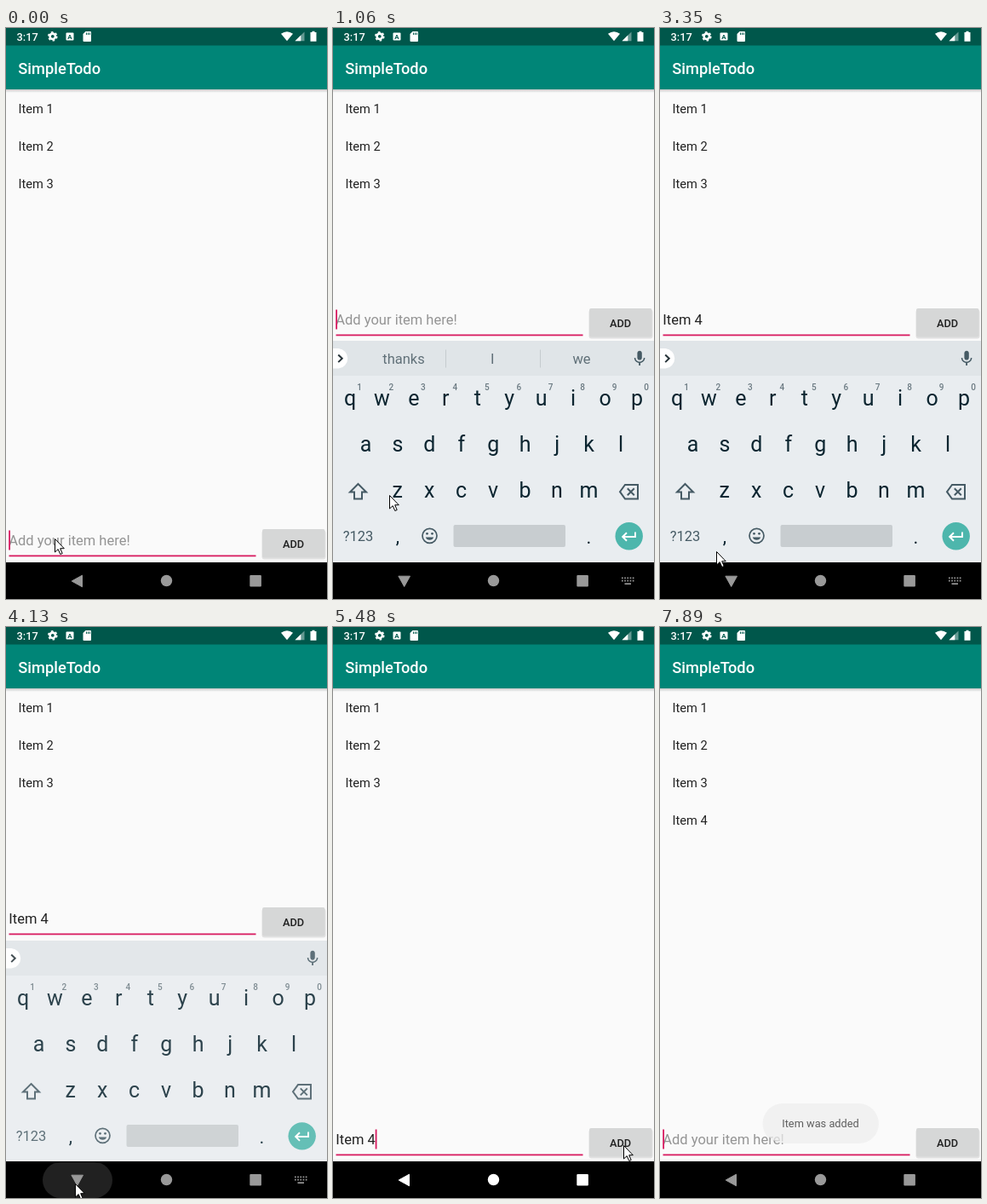
These frames come from a looping animation (377 px wide and 670 px high, 8 s). An HTML page:

```html
<!DOCTYPE html>
<html lang="en">
<head>
<meta charset="utf-8">
<title>Todo list demo</title>
<style>
  html, body { margin: 0; width: 100%; height: 100%; overflow: hidden; background: #fafafa; }
  svg { display: block; width: 377px; height: 670px; font-family: Roboto, sans-serif; }
  text { white-space: pre; }
  .mid { text-anchor: middle; }
  .line { fill: none; stroke: #455a64; stroke-width: 2; }
</style>
</head>
<body>
<svg viewBox="0 0 377 670">
  <defs>
    <linearGradient id="shade" x2="0" y2="1">
      <stop stop-opacity=".2"/><stop offset="1" stop-opacity="0"/>
    </linearGradient>
  </defs>
  <rect width="377" height="670" fill="#fafafa"/>

  <!-- status and app bars -->
  <rect width="377" height="72" fill="#008577"/>
  <rect width="377" height="20.5" fill="#00574b"/>
  <rect y="72" width="377" height="4" fill="url(#shade)"/>
  <g fill="#fff">
    <text x="12.5" y="14.6" font-size="12.8" font-weight="500">3:17</text>
    <g fill="none" stroke="#fff">
      <circle cx="54.8" cy="9.8" r="3.2" stroke-width="2.6"/>
      <circle cx="54.8" cy="9.8" r="5" stroke-width="1.6" stroke-dasharray="2.6 2.636"/>
    </g>
    <rect x="70.5" y="5.5" width="9" height="9" rx="1"/>
    <text class="mid" x="75" y="12.8" font-size="8" font-weight="700" fill="#00574b">A</text>
    <path d="M93.5 4H99q1 0 1 1v10q0 1-1 1h-7.500q-1 0-1-1V7z"/>
    <path d="M94.500 5.500v2.500M96.500 5.500v2.500M98.400 5.500v2.500" stroke="#00574b"/>
    <path d="M323 6.700Q330 1.700 337 6.700L330 15.300z"/>
    <path d="M350.500 4.500V15.300H339.500z" opacity=".4"/>
    <path d="M346.300 8.600V15.300H339.500z"/>
    <path d="M357.500 5h2v-1.300h3V5h2v10.800h-7z"/>
    <text x="14.300" y="53.500" font-size="18.300" font-weight="500">SimpleTodo</text>
  </g>
  <g font-size="14.670" fill="#212121">
    <text x="14.500" y="100.300">Item 1</text>
    <text x="14.500" y="144.300">Item 2</text>
    <text x="14.500" y="188.300">Item 3</text>
    <text x="14.500" y="232.300" id="added">Item 4</text>
  </g>

  <!-- input row -->
  <g id="row">
    <text id="hint" x="3.300" y="607" font-size="16.500" fill="#949494">Add your item here!</text>
    <text id="entry" x="3.300" y="607" font-size="16.500" fill="#212121"></text>
    <rect id="composing" x="3.500" y="608.500" height="1" fill="#212121"/>
    <rect id="caret" y="589.500" width="1.800" height="23" fill="#d81b60"/>
    <rect x="3.500" y="618.500" width="290" height="1.800" fill="#d81b60"/>
    <rect x="300.500" y="589.500" width="75" height="34" rx="3" opacity=".1"/>
    <rect x="301" y="588" width="73.500" height="33.500" rx="2" fill="#d6d7d7"/>
    <rect id="press" x="301" y="588" width="73.500" height="33.500" rx="2"/>
    <text class="mid" x="337.600" y="609.500" font-size="12.800" font-weight="500" fill="#212121">ADD</text>
  </g>

  <g id="toast">
    <rect x="120.500" y="560" width="136.500" height="46" rx="23" opacity=".05"/>
    <rect x="121" y="559" width="135.500" height="46" rx="23" fill="#eee"/>
    <text class="mid" x="188.500" y="586.700" font-size="12.800" fill="#222">Item was added</text>
  </g>

  <g id="keyboard">
    <rect y="367" width="377" height="262" fill="#e9edf0"/>
    <rect y="367" width="377" height="41" fill="#e0e5e8"/>
    <path d="M0 376H6.500a11.800 11.800 0 0 1 0 23.500H0z" fill="#fff"/>
    <path class="line" d="M6.200 383.500l4.500 4.300l-4.500 4.300" style="stroke:#263238"/>
    <g transform="translate(349.300 377) scale(.9)" fill="#455a64">
      <path d="M12 14c1.660 0 3-1.340 3-3V5c0-1.660-1.340-3-3-3S9 3.340 9 5v6c0 1.660 1.340 3 3 3z"/>
      <path d="M17.300 11c0 3-2.540 5.100-5.300 5.100S6.700 14 6.700 11H5c0 3.410 2.720 6.230 6 6.720V21h2v-3.280c3.280-.480 6-3.300 6-6.720z"/>
    </g>
    <g id="words" font-size="16.500" fill="#607078">
      <path d="M132.500 377.500v21M243.500 377.500v21" stroke="#c5cbce"/>
    </g>
    <g id="keys" fill="#0b2530"></g>
    <path class="line" d="M29.500 535L39 544.500H34V552.500H25V544.500H20z"/>
    <path class="line" d="M343 536H358V552.500H343L337 544.200zM345.800 540.300l8 8m0-8l-8 8"/>
    <text class="mid" x="29.500" y="602" font-size="16.500" fill="#455a64">?123</text>
    <circle class="line" cx="113.500" cy="595.800" r="8.500" style="stroke-width:1.700"/>
    <path d="M108.800 597.500a5 5 0 0 0 9.400 0z" fill="#455a64"/>
    <circle cx="110.500" cy="593.300" r="1.400" fill="#455a64"/>
    <circle cx="116.500" cy="593.300" r="1.400" fill="#455a64"/>
    <rect x="141.500" y="583" width="131.500" height="26" rx="2" fill="#c8cdd0"/>
    <circle cx="347.700" cy="596.300" r="16.200" fill="#4db6ac"/>
    <path class="line" d="M355 591.500V597H340.500M345 592.200L340.200 597L345 601.800" style="stroke:#fff"/>
  </g>

  <!-- navigation bar -->
  <rect y="627" width="377" height="43"/>
  <rect id="ripple" y="628" height="42" fill="#fff"/>
  <g id="nav">
    <path id="back" d="M-6.500 0L5.800-6.800V6.800z" stroke-width="1" stroke-linejoin="round"/>
    <circle cx="188.500" cy="648.500" r="6.700"/>
    <rect x="286.300" y="642" width="13.600" height="13.600" rx="1"/>
  </g>
  <g id="switcher" fill="none" stroke="#999" stroke-width="1.700">
    <path d="M339 645.300h14.500M339 648.700h14.500" stroke-dasharray="1.700 1.500"/>
    <path d="M342.500 652.200h7.500"/>
  </g>

  <path id="mouse" d="M.5.500V16L4.200 12.600L6.800 18.500L9.200 17.500L6.700 11.700H11.300z" fill="#fff" stroke="#000"/>
</svg>

<script>
const $ = id => document.getElementById(id);
const clamp = v => Math.max(0, Math.min(1, v));
const ramp = (t, from, to) => clamp((t - from) / (to - from));
const set = (id, attrs) => {
  for (const name in attrs) $(id).setAttribute(name, attrs[name]);
};
const show = (id, on) => set(id, { opacity: on ? 1 : 0 });

function label(parent, text, x, y, size) {
  const el = document.createElementNS('http://www.w3.org/2000/svg', 'text');
  el.textContent = text;
  const attrs = { x, y, class: 'mid', 'font-size': size };
  for (const name in attrs) el.setAttribute(name, attrs[name]);
  return $(parent).appendChild(el);
}

// Keyboard letters
[['qwertyuiop', 20, 443], ['asdfghjkl', 38.5, 497.3], ['zxcvbnm', 75.7, 551.3]].forEach(([row, x, y], r) => {
  [...row].forEach((letter, i) => {
    const cx = x + i * 37.45;
    label('keys', letter, cx, y, 25);
    if (r) return;
    const digit = label('keys', (i + 1) % 10, cx + 11, 425, 10);
    digit.setAttribute('fill', '#6b7a82');
    digit.setAttribute('font-weight', 500);
  });
});
label('keys', ',', 76, 604, 22);
label('keys', '.', 300.5, 604.5, 22);
const words = [83, 187.3, 292].map(x => label('words', '', x, 394, 16.5));

// Time, entry text, suggestions
const typing = [
  [0, '', 'thanks I we'],
  [1490, 'I', 'thanks I we'],
  [1640, 'I', "I I'm I'll"],
  [1760, 'It', "It It's Its"],
  [1880, 'Ite', 'Ite Item It'],
  [2000, 'Item', 'Items Item Itemize'],
  [2120, 'Item ', 'and by is'],
  [2400, 'Item 4', ''],
  [5870, '', '']
];

// Time, x, y of the mouse pointer
const pointer = [
  [0, 57, 599], [240, 62, 600], [360, 65, 600], [780, 91, 572], [900, 66, 548],
  [2930, 148, 542], [3230, 96, 584], [3350, 66, 614], [3470, 70, 634],
  [3590, 77, 648], [3710, 81, 653], [4550, 102, 653], [4670, 138, 652],
  [4790, 174, 651], [4940, 228, 650], [5090, 286, 643], [5210, 319, 617],
  [5360, 340, 614], [5480, 341, 608], [7250, 341, 628], [7370, 340, 646], [7520, 340, 700]
];

const caretFlips = [510, 1060, 2930, 3470, 4010, 4400, 4940, 5480, 6410, 6830, 7370, 7890];
const at = (list, t) => list.findLast(step => step[0] <= t);

function draw(t) {
  const raised = t >= 220 && t < 4270;
  const [, text, choice] = at(typing, t);
  const composing = t >= 1490 && t < 2120;

  set('row', { transform: `translate(0 ${raised ? -259 : 0})` });
  $('entry').textContent = text;
  const width = text ? $('entry').getComputedTextLength() : 0;
  show('hint', !text);
  set('composing', { width: composing ? width : 0 });
  set('caret', { x: 3.2 + width });
  show('caret', caretFlips.filter(flip => flip <= t).length % 2 === 0);
  set('press', { opacity: 0.14 * ramp(t, 5700, 5780) * (1 - ramp(t, 5870, 6120)) });
  show('added', t >= 5870);
  set('toast', { opacity: ramp(t, 6000, 6350) * (1 - ramp(t, 7740, 8270)) });

  const opening = ramp(t, 200, 350), closing = ramp(t, 4090, 4380);
  const slide = 52 * ((1 - opening) ** 2 + closing ** 2);
  set('keyboard', { opacity: opening * (1 - closing), transform: `translate(0 ${slide})` });
  const choices = choice.split(' ');
  words.forEach((el, i) => {
    el.textContent = choices[i] || '';
    const strong = i === 1 && t >= 1640 && composing;
    el.setAttribute('font-weight', strong ? 700 : 400);
    el.setAttribute('fill', strong ? '#000' : '#607078');
  });
  show('words', choice);

  const half = 27 + 14 * ramp(t, 3860, 4010);
  set('ripple', {
    x: 84 - half, width: half * 2, rx: 21,
    opacity: t < 3860 ? 0 : 0.13 * (1 - ramp(t, 4200, 4400))
  });
  const bright = ramp(t, 4250, 4380) * (1 - ramp(t, 6100, 6850));
  const tone = Math.round(153 + 102 * bright);
  const colour = `rgb(${tone},${tone},${tone})`;
  set('nav', { fill: colour });
  const turn = -90 * (ramp(t, 200, 350) - ramp(t, 4200, 4380));
  set('back', { stroke: colour, transform: `translate(83.700 649) rotate(${turn})` });
  show('switcher', t >= 230 && t < 4300);

  const [, x, y] = at(pointer, t);
  set('mouse', { transform: `translate(${x} ${y})` });
}

function frame() {
  draw(performance.now() % 8000);
  requestAnimationFrame(frame);
}
frame();
</script>
</body>
</html>
```
